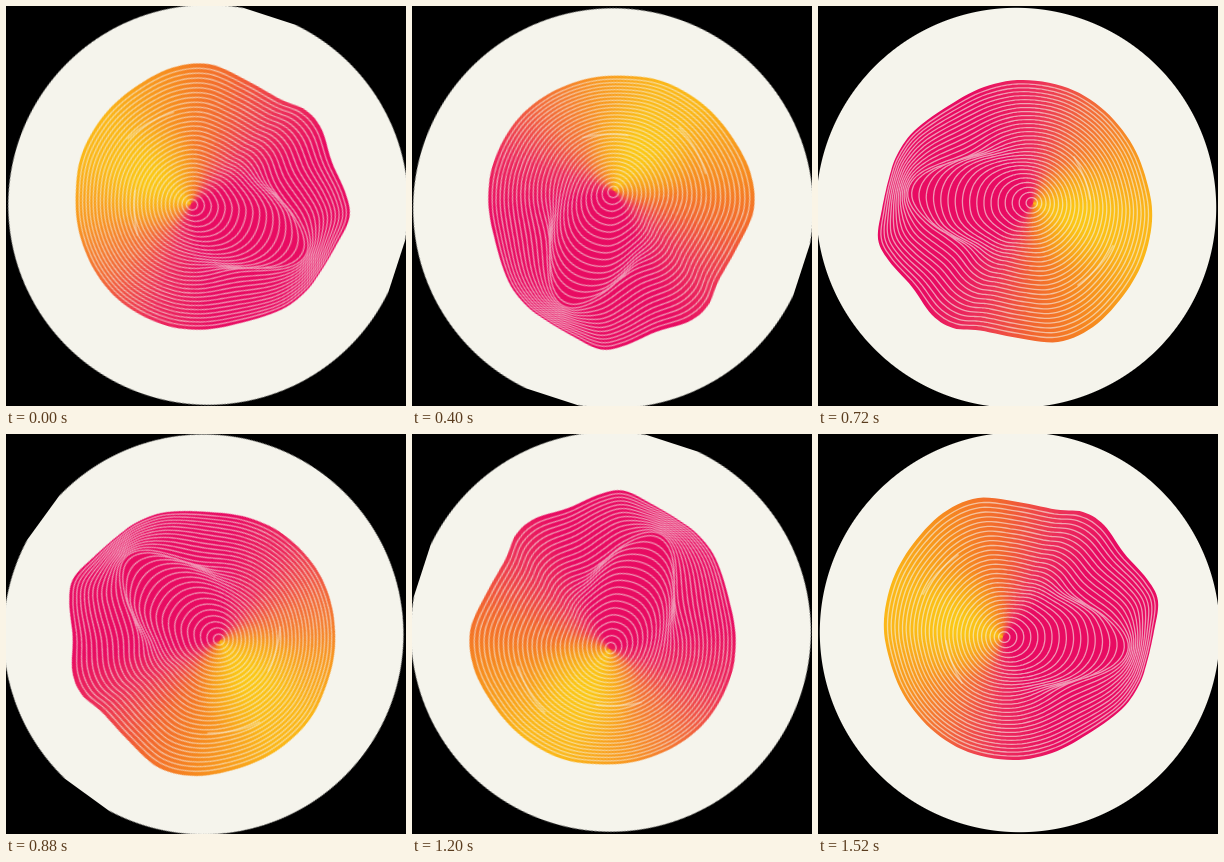
Animation, 400 px wide and 400 px high, one loop 1.6 s. Source, as an HTML page:

```html
<!DOCTYPE html>
<html lang="en">
<head>
<meta charset="utf-8">
<title>Spinning blob</title>
<style>
  html, body { margin: 0; width: 100%; height: 100%; overflow: hidden; background: #000; }
  #spin {
    position: absolute; left: 0; top: 0; width: 400px; height: 400px; overflow: hidden;
    background: radial-gradient(circle at 201.8px 198.2px, #f5f4ec 199.5px, transparent 200.5px);
    animation: spin 1.6s steps(20) infinite;
  }
  #blob, svg { position: absolute; left: 0; top: 0; width: 400px; height: 400px; }
  #blob {
    background:
      radial-gradient(circle at 138px 190px, rgba(251, 206, 20, .75), rgba(251, 206, 20, 0) 56px),
      conic-gradient(from 0deg at 185px 203px,
        #f2662f 0deg, #ec2f5a 27deg, #e80b62 48deg, #e80b62 150deg,
        #ec2a5c 180deg, #f2683a 210deg, #f8961f 243deg, #fbb718 275deg,
        #fbb718 298deg, #f6891f 335deg, #f2662f 360deg);
  }
  path { fill: none; stroke: #f5f4ec; stroke-linecap: round; }
  #rings { stroke-width: 1.3; stroke-opacity: .6; }
  #glints { stroke-width: 1.8; stroke-opacity: .4; }
  @keyframes spin {
    from { transform: rotate(18deg); }
    to { transform: rotate(378deg); }
  }
</style>
</head>
<body>
<div id="spin">
  <div id="blob"></div>
  <svg viewBox="0 0 400 400">
    <path id="rings"/>
    <path id="glints" d="M105 160Q116 138 140 121M128 207Q132 230 144 249"/>
  </svg>
</div>
<script>
const APEX = [185, 203], RINGS = 30, STEPS = 7;
const CUSP = { angle: 0.1, t: 0.58, push: 42 };
const outline = [
  [160, 64], [200, 68], [238, 75.5], [265, 78], [286, 91], [306, 119], [329, 145],
  [340, 167], [336, 197], [329, 228], [321, 251], [304, 275], [270, 300],
  [234, 319], [195, 326], [150, 318], [113, 295], [85, 260], [70, 220],
  [66, 185], [75, 145], [95, 110], [125, 79]
];

const spline = (a, b, c, d, u) =>
  b + u / 2 * (c - a + u * (2 * a - 5 * b + 4 * c - d + u * (3 * (b - c) + d - a)));

// Outline as angles and radii seen from the apex
const rim = outline.flatMap((_, i) => {
  const [a, b, c, d] = [-1, 0, 1, 2].map(k => outline.at((i + k) % outline.length));
  return Array.from({ length: STEPS }, (_, k) => {
    const [x, y] = [0, 1].map(j => spline(a[j], b[j], c[j], d[j], k / STEPS) - APEX[j]);
    return { angle: Math.atan2(y, x), radius: Math.hypot(x, y) };
  });
});

// Rings start round, push out to a cusp, then relax into the outline
function radiusAt({ angle, radius }, t) {
  const base = t * (132 + (radius - 132) * Math.pow(t, 0.7));
  const gap = t - CUSP.t;
  const rise = gap < 0 ? t / CUSP.t : (1 - t) / (1 - CUSP.t);
  const width = 0.22 + (gap < 0 ? -1.5 : 0.6) * gap;
  const off = Math.atan2(Math.sin(angle - CUSP.angle), Math.cos(angle - CUSP.angle));
  return base + CUSP.push * rise * Math.exp(-off * off / (2 * width * width));
}

const ring = t => 'M' + rim.map(p => {
  const r = radiusAt(p, t);
  return (APEX[0] + r * Math.cos(p.angle)).toFixed(1) + ' ' +
         (APEX[1] + r * Math.sin(p.angle)).toFixed(1);
}).join('L') + 'Z';

document.getElementById('blob').style.clipPath = `path('${ring(1)}')`;
document.getElementById('rings').setAttribute('d',
  Array.from({ length: RINGS - 1 }, (_, i) => ring((i + 1) / RINGS)).join(''));
</script>
</body>
</html>
```
